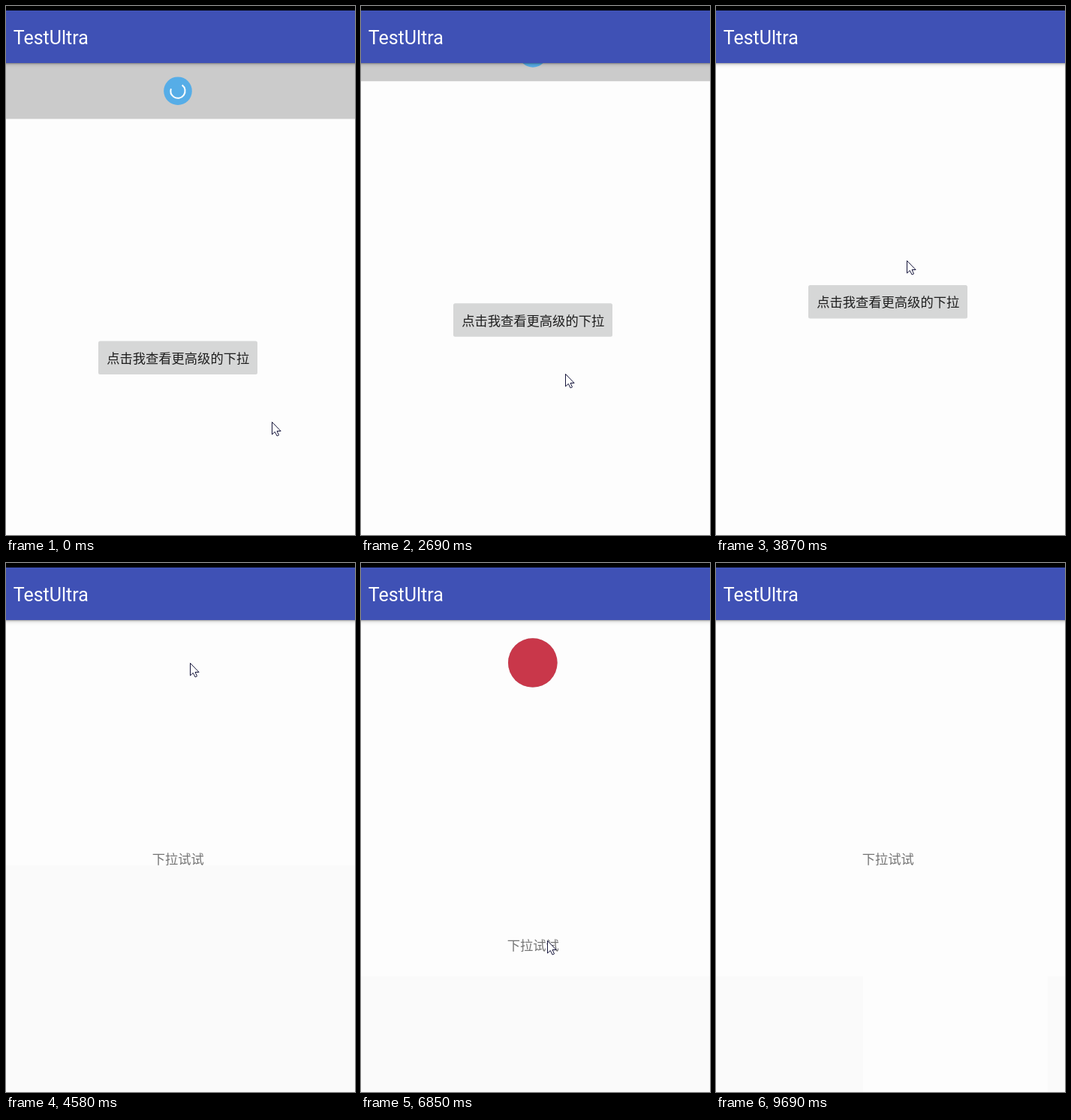
These frames come from a looping animation (465x705 px, 9.79 s). An HTML page with a canvas:

```html
<!DOCTYPE html>
<html lang="zh">
<head>
<meta charset="utf-8">
<title>TestUltra</title>
<style>
  html, body { margin: 0; width: 100%; height: 100%; overflow: hidden; background: #fdfdfd; }
  canvas { display: block; width: 465px; height: 705px; }
</style>
</head>
<body>
<canvas id="stage"></canvas>
<script>
const W = 465, H = 705, LOOP = 9790;
const BAR_TOP = 6, BAR_BOTTOM = 76;
const PAGE = '#fdfdfd', BACKDROP = '#fafafa';
const CJK = '"Noto Sans CJK SC", "Noto Sans CJK", "Noto Sans CJK JP", sans-serif';

// Moments in ms
const STEP = 141, TAP = 3730, OPEN = 3950, RELEASE = 5750, LEAVE = 7130;
const CLOSE_1 = 2471, CLOSE_2 = 8750;
// Pull distances in px
const PULL_1 = 74.5, PULL_2 = 148, REST = 115, TOUCH_Y = 153;

const canvas = document.getElementById('stage');
const dpr = window.devicePixelRatio || 1;
canvas.width = W * dpr;
canvas.height = H * dpr;
const ctx = canvas.getContext('2d');

// Pointer turning points: time, x, y
const path = [
  [0, 354, 554], [1150, 327, 584], [2250, 274, 540], [2679, 272, 490], [3200, 257, 382],
  [TAP, 256, 380], [4576, 245, 133], [5422, 255, 396], [RELEASE, 255, 405],
  [6832, 248, 503], [LEAVE, 250, 512], [8000, 438, 730]
];

const clamp = (v, a, b) => Math.min(b, Math.max(a, v));
const mix = (a, b, k) => a + (b - a) * k;

function pointer(t) {
  const i = path.findIndex(p => p[0] > t);
  if (i < 0) return path.at(-1).slice(1);
  const [ta, xa, ya] = path[i - 1], [tb, xb, yb] = path[i];
  const k = (t - ta) / (tb - ta);
  return [Math.round(mix(xa, xb, k)), Math.round(mix(ya, yb, k))];
}

// Viscous scroll easing over one second
function viscous(ms) {
  const x = clamp(ms / 1000, 0, 1) * 8;
  const e = Math.exp(-1);
  return x < 1 ? x - (1 - Math.exp(-x)) : e + (1 - e) * (1 - Math.exp(1 - x));
}

function firstOffset(t) {
  const off = PULL_1 * (1 - viscous(t - CLOSE_1));
  return off < .5 ? 0 : off;
}

function secondOffset(t) {
  if (t < path[6][0]) return 0;
  if (t < RELEASE) return Math.round(clamp((pointer(t)[1] - TOUCH_Y) / 1.7, 0, PULL_2));
  if (t < CLOSE_2) {
    const k = clamp((t - RELEASE) / 200, 0, 1);
    return Math.round(mix(PULL_2, REST, 1 - (1 - k) ** 2));
  }
  return Math.round(REST * (1 - viscous(t - CLOSE_2)));
}

function rect(color, x, y, w, h) {
  ctx.fillStyle = color;
  ctx.fillRect(x, y, w, h);
}

function disc(color, x, y, r) {
  ctx.fillStyle = color;
  ctx.beginPath();
  ctx.arc(x, y, r, 0, Math.PI * 2);
  ctx.fill();
}

function text(str, x, y, color, font, align = 'center') {
  ctx.font = font;
  ctx.textAlign = align;
  ctx.fillStyle = color;
  ctx.fillText(str, x, y);
}

function appBar() {
  for (let i = 0; i < 8; i++) rect(`rgba(0,0,0,${.3 * .55 ** i})`, 0, BAR_BOTTOM + i, W, 1);
  rect('#3f51b5', 0, BAR_TOP, W, BAR_BOTTOM - BAR_TOP);
  text('TestUltra', 9.7, 51, '#fff', '25px Roboto, sans-serif', 'left');
}

function spinner(y, t) {
  disc('#56ade7', 229, y, 18.8);
  const turn = Math.min(t, CLOSE_1) / 1000 * Math.PI * 2;
  ctx.strokeStyle = '#fff';
  ctx.lineWidth = 2;
  ctx.beginPath();
  ctx.arc(229, y, 9.6, turn - Math.PI * .3, turn + Math.PI * 1.1);
  ctx.stroke();
}

function firstPage(t) {
  const off = firstOffset(t);
  rect(PAGE, 0, BAR_TOP, W, H);
  rect('#cbcbcb', 0, BAR_BOTTOM, W, off);
  if (off > 0) spinner(38.7 + off, t);
  ctx.fillStyle = '#d6d7d7';
  ctx.beginPath();
  ctx.roundRect(123, 372 + off, 212, 44.5, 2.5);
  ctx.fill();
  text('点击我查看更高级的下拉', 229.2, 401.3 + off, '#1e1e1e', '500 17.3px ' + CJK);
  appBar();
}

// Disc that fills up with a moving wave
function waveDisc(cy, t) {
  const cx = 228.8, r = 32.8, amp = 3.5;
  const phase = ((t - 4610) / 2346 % 1 + 1) % 1;
  const level = 1 - (1 - phase) ** 1.5;
  const base = mix(cy + r + amp, cy - r - amp, level);
  disc('#b6b7b9', cx, cy, r);
  ctx.save();
  ctx.clip();
  ctx.beginPath();
  ctx.moveTo(cx - r, cy + r);
  for (let x = cx - r; x <= cx + r + 1; x++) {
    const a = (x - 210 - (t - 5422) * .06) / 80 * Math.PI * 2;
    ctx.lineTo(x, base - amp * Math.cos(a));
  }
  ctx.lineTo(cx + r + 1, cy + r);
  ctx.fillStyle = '#c9374a';
  ctx.fill();
  ctx.restore();
}

function secondPage(t) {
  const off = secondOffset(t);
  const edge = 403 + (t < RELEASE ? off : PULL_2);
  rect(BACKDROP, 0, BAR_TOP, W, H);
  rect(PAGE, 0, BAR_TOP, W, edge - BAR_TOP);
  if (t >= LEAVE) {
    // The pointer clears the backdrop on its way out
    const [x, y] = pointer(t);
    rect(PAGE, 196, edge, Math.min(x + 12, 442) - 196, Math.max(0, y + 19 - edge));
  }
  if (off > REST) rect('#a7a7a7', 0, BAR_BOTTOM, W, off - REST - 1);
  if (off > 0) waveDisc(off + 18, t);
  text('下拉试试', 229.2, 401.3 + off, '#757575', '17.3px ' + CJK);
  appBar();
}

function arrow(x, y) {
  const pts = [[0, 0], [0, 16.5], [3.8, 13], [6.6, 18.5], [9, 17.4], [6.6, 12], [11.6, 12]];
  ctx.beginPath();
  pts.forEach(([dx, dy]) => ctx.lineTo(x + .5 + dx, y + .5 + dy));
  ctx.closePath();
  ctx.fillStyle = '#fff';
  ctx.fill();
  ctx.strokeStyle = '#14143a';
  ctx.lineWidth = 1;
  ctx.stroke();
}

function draw(t) {
  ctx.setTransform(dpr, 0, 0, dpr, 0, 0);
  if (t < OPEN + 350) firstPage(t);
  if (t >= OPEN) {
    const fade = clamp((t - OPEN) / 200, 0, 1);
    const slide = clamp((t - OPEN) / 350, 0, 1);
    ctx.save();
    ctx.globalAlpha = 1 - (1 - fade) ** 4;
    ctx.translate(0, 56 * (1 - slide) ** 5);
    secondPage(t);
    ctx.restore();
  }
  rect('#000', 0, 0, W, BAR_TOP);
  arrow(...pointer(t));
}

// The screen refreshes in even steps, restarting with the tap
function snap(t) {
  const from = t < TAP ? 0 : TAP;
  return from + Math.floor((t - from + 10) / STEP) * STEP;
}

const start = performance.now();

function frame() {
  draw(snap((performance.now() - start) % LOOP));
  requestAnimationFrame(frame);
}
frame();
</script>
</body>
</html>
```
